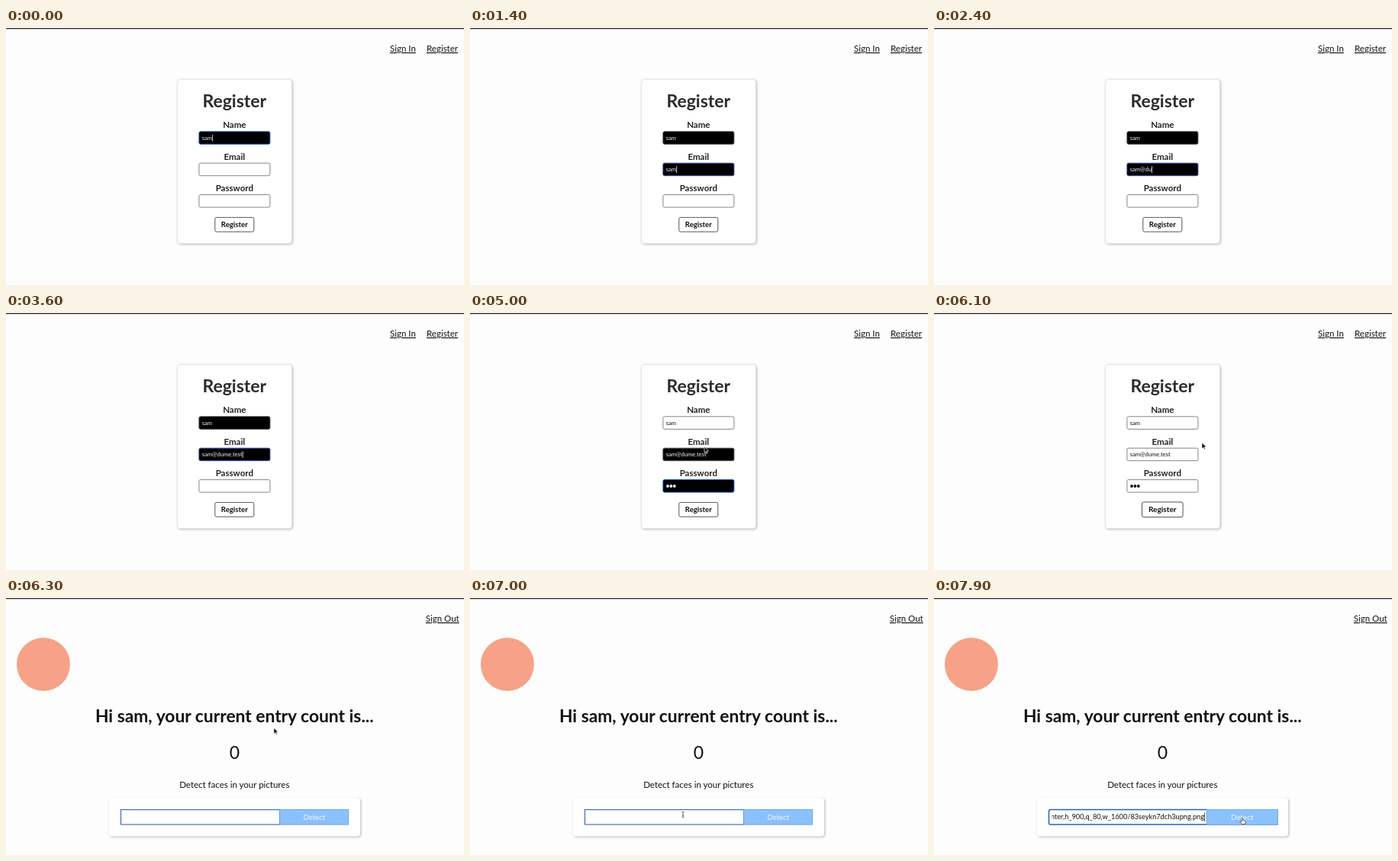
Write an HTML page that moves like this. It is 600x337 px and loops after 8000 ms.

```html
<!DOCTYPE html>
<html lang="en">
<head>
<meta charset="utf-8">
<title>Register</title>
<style>
html, body { margin: 0; width: 100%; height: 100%; overflow: hidden; background: #fdfdfd; }
svg { display: block; width: 100vw; height: 100vh; font-family: Lato, sans-serif; }
text { white-space: pre; }

.nav { font-size: 11.5px; fill: #111; text-decoration: underline; text-decoration-thickness: .8px; }
.mid { text-anchor: middle; }
.title { font-size: 23px; font-weight: 700; fill: #2c2c2c; }
.label { font-size: 11.5px; font-weight: 700; fill: #222; }
.hello { font-size: 22.8px; font-weight: 700; fill: #111; }
.count { font-size: 23px; fill: #111; }
.hint { font-size: 11.5px; fill: #111; }
.card { fill: #fff; filter: drop-shadow(1.5px 1.5px 1.8px rgba(0, 0, 0, .27)); }

/* Every timeline shares one 8 s loop; 1.25% is 100 ms. */
.field, .login, .home, .pointer g, .shape, .grow, .query, .pasted {
  animation: 8s step-end infinite;
}
.field rect { fill: var(--bg); stroke: var(--line); }
.field text { font-size: 7.6px; fill: var(--fg); }
.field circle { fill: var(--fg); }
.caret { stroke: var(--fg, #111); stroke-width: .8; }

.name { animation-name: name; }
.email { animation-name: email; }
.pass { animation-name: pass; }
@keyframes name {
  0% { --bg: #000; --fg: #f2f2f2; --line: #1f5fc4; }
  7.5% { --line: #4a4a4a; }
  62.5%, 100% { --bg: #fff; --fg: #111; --line: #858585; }
}
@keyframes email {
  0% { --bg: #fff; --fg: #111; --line: #858585; }
  7.5% { --bg: #000; --fg: #f2f2f2; --line: #33499c; }
  48.75% { --line: #4a4a4a; }
  63.75%, 100% { --bg: #fff; --fg: #111; --line: #858585; }
}
@keyframes pass {
  0% { --bg: #fff; --fg: #111; --line: #858585; }
  48.75% { --bg: #000; --fg: #f2f2f2; --line: #1650b4; }
  50% { --line: #1458d0; }
  65% { --bg: #fff; --fg: #111; }
  68.75%, 100% { --bg: #fff; --fg: #111; --line: #858585; }
}

.login { animation-name: login; }
.home { animation-name: home; }
@keyframes login { 0% { visibility: visible; } 78.75%, 100% { visibility: hidden; } }
@keyframes home { 0% { visibility: hidden; } 78.75%, 100% { visibility: visible; } }

.grow { transform-box: fill-box; transform-origin: center; animation-timing-function: linear; }
.submit { animation-name: submit; }
.detect { animation-name: detect; }
@keyframes submit { 0%, 67.5% { transform: none; } 70%, 100% { transform: scale(1.05); } }
@keyframes detect { 0%, 94.5% { transform: none; } 97%, 100% { transform: scale(1.035); } }

.query { fill: #fff; animation-name: query; }
@keyframes query {
  0% { stroke: #3566a8; stroke-width: 1.1; rx: 0; }
  90%, 100% { stroke: #2b60bd; stroke-width: 1.5; rx: 2px; }
}
.pasted { animation-name: pasted; }
.pasted text { font-size: 9.2px; fill: #111; text-anchor: end; }
@keyframes pasted { 0% { opacity: 0; } 93.75%, 100% { opacity: 1; } }

.pointer g.path { animation-name: path; animation-timing-function: linear; }
@keyframes path {
  0%, 62.5% { transform: translate(307px, 175px); }
  65% { transform: translate(303px, 214px); }
  67.5%, 72.5% { transform: translate(301px, 255px); }
  75% { transform: translate(331px, 212px); }
  76.25%, 78.75% { transform: translate(351px, 170px); }
  85%, 91.25% { transform: translate(279px, 284px); }
  95% { transform: translate(392px, 289px); }
  97.5%, 100% { transform: translate(404px, 289px); }
}
.pointer .arrow { animation-name: arrow; }
.pointer .beam { animation-name: beam; }
.pointer .hand { animation-name: hand; }
@keyframes arrow {
  0% { opacity: 0; } 62.5% { opacity: 1; } 67.5% { opacity: 0; }
  72.5% { opacity: 1; } 82.5%, 100% { opacity: 0; }
}
@keyframes beam { 0% { opacity: 0; } 82.5% { opacity: 1; } 94.375%, 100% { opacity: 0; } }
@keyframes hand {
  0% { opacity: 0; } 67.5% { opacity: 1; } 72.5% { opacity: 0; } 94.375%, 100% { opacity: 1; }
}
</style>
</head>
<body>
<svg viewBox="0 0 600 337">
  <defs>
    <clipPath id="inside"><rect x="154.5" y="278" width="202" height="19"/></clipPath>
  </defs>
  <rect width="600" height="337" fill="#fdfdfd"/>
  <rect width="600" height="1.3" fill="#2b2b2b"/>

  <g class="login">
    <text class="nav" x="503" y="31">Sign In</text>
    <text class="nav" x="551" y="31">Register</text>
    <rect class="card" x="224.5" y="67.5" width="150" height="215" rx="4" stroke="#e4e4e4" stroke-width=".8"/>
    <text class="title mid" x="299.3" y="104">Register</text>

    <text class="label mid" x="299.3" y="131">Name</text>
    <g class="field name">
      <rect x="252.9" y="135.8" width="93" height="16.5" rx="2"/>
      <text x="256.8" y="146.8">sam</text>
      <path class="caret" d="M0 139.5v9"/>
    </g>

    <text class="label mid" x="299.3" y="172.5">Email</text>
    <g class="field email">
      <rect x="252.9" y="177.2" width="93" height="16.5" rx="2"/>
      <text x="256.8" y="188.2"></text>
      <path class="caret" d="M0 181v9"/>
    </g>

    <text class="label mid" x="299.3" y="213.9">Password</text>
    <g class="field pass">
      <rect x="252.9" y="218.6" width="93" height="16.5" rx="2"/>
      <circle cx="259" cy="227" r="1.9"/>
      <circle cx="263.4" cy="227" r="1.9"/>
      <circle cx="267.8" cy="227" r="1.9"/>
      <path class="caret" d="M0 222.4v9"/>
    </g>

    <g class="grow submit">
      <rect x="273.8" y="248.4" width="51" height="18.8" rx="2" fill="#fff" stroke="#444" stroke-width=".9"/>
      <text class="mid" x="299.3" y="261.2" font-size="9.6" font-weight="700" fill="#111">Register</text>
    </g>
  </g>

  <g class="home">
    <text class="nav" x="549.8" y="31">Sign Out</text>
    <circle cx="49" cy="87" r="35" fill="#f7a288"/>
    <text class="hello mid" x="299.3" y="162.6">Hi sam, your current entry count is...</text>
    <text class="count mid" x="299.3" y="211">0</text>
    <text class="hint mid" x="299.3" y="248.6">Detect faces in your pictures</text>
    <rect class="card" x="135" y="262" width="329" height="50.5" rx="4"/>
    <rect class="query" x="150.5" y="277.6" width="208" height="19.4"/>
    <g class="pasted">
      <g clip-path="url(#inside)">
        <text x="354" y="290.4">center,h_900,q_80,w_1600/83seykn7dch3upng.png</text>
      </g>
      <path class="caret" d="M354.6 281.5v11.5"/>
    </g>
    <g class="grow detect">
      <rect x="358.5" y="277.5" width="90.2" height="19.6" fill="#8ac1ff" stroke="#6f9dd2" stroke-width=".9"/>
      <text class="mid" x="403.8" y="290.7" font-size="9.5" fill="#f4f9ff">Detect</text>
    </g>
  </g>

  <g class="pointer">
    <g class="path">
      <g class="arrow">
        <path d="M0 0v8l1.9-1.7 1.2 2.7 1.3-.6-1.2-2.6h2.6z" fill="#000" stroke="#fff" stroke-width=".7"/>
      </g>
      <g class="beam">
        <path d="M-1.6-3.6q1.6 0 1.6 1v5.2q0 1-1.6 1M1.6-3.6q-1.6 0-1.6 1M0 2.6q0 1 1.6 1M-1 .9h2" fill="none" stroke="#333" stroke-width=".7"/>
      </g>
      <g class="hand">
        <path d="M-.8 0q.8-.9 1.5 0v2.6l2.6.6q.9.3.8 1.3l-.6 3h-4.2l-2.3-3q-.1-1.1 1-.8l1.2.9z" fill="#fff" stroke="#222" stroke-width=".6"/>
      </g>
    </g>
  </g>
</svg>
<script>
const LOOP = 8000, LEFT = 256.8;
const address = "sam@dume.test";
const keys = [1000, 1200, 1400, 1800, 2300, 2400, 2800, 2900, 3000, 3200, 3400, 3500, 3600];
const dotKeys = [4200, 4300, 4500];

const find = (s) => document.querySelector(s);
const typed = (times, t) => times.filter((k) => k <= t).length;
const nameText = find(".name text"), emailText = find(".email text");
const dots = [...document.querySelectorAll(".pass circle")];

function setCaret(field, on, x) {
  const caret = find(`.${field} .caret`);
  caret.setAttribute("transform", `translate(${x + 0.5} 0)`);
  caret.setAttribute("opacity", on ? 1 : 0);
}

function draw(t) {
  const count = typed(keys, t), dotCount = typed(dotKeys, t);
  emailText.textContent = address.slice(0, count);
  dots.forEach((dot, i) => dot.setAttribute("opacity", i < dotCount ? 1 : 0));

  setCaret("name", t < 400, LEFT + nameText.getComputedTextLength());
  setCaret("email", t >= 600 && t < 3900, LEFT + (count ? emailText.getComputedTextLength() : 0));
  setCaret("pass", t >= 3900 && t < 5000, LEFT + dotCount * 4.4);
}

let start;
function tick(now) {
  start ??= now;
  draw((now - start) % LOOP);
  requestAnimationFrame(tick);
}
draw(0);
requestAnimationFrame(tick);
</script>
</body>
</html>
```
